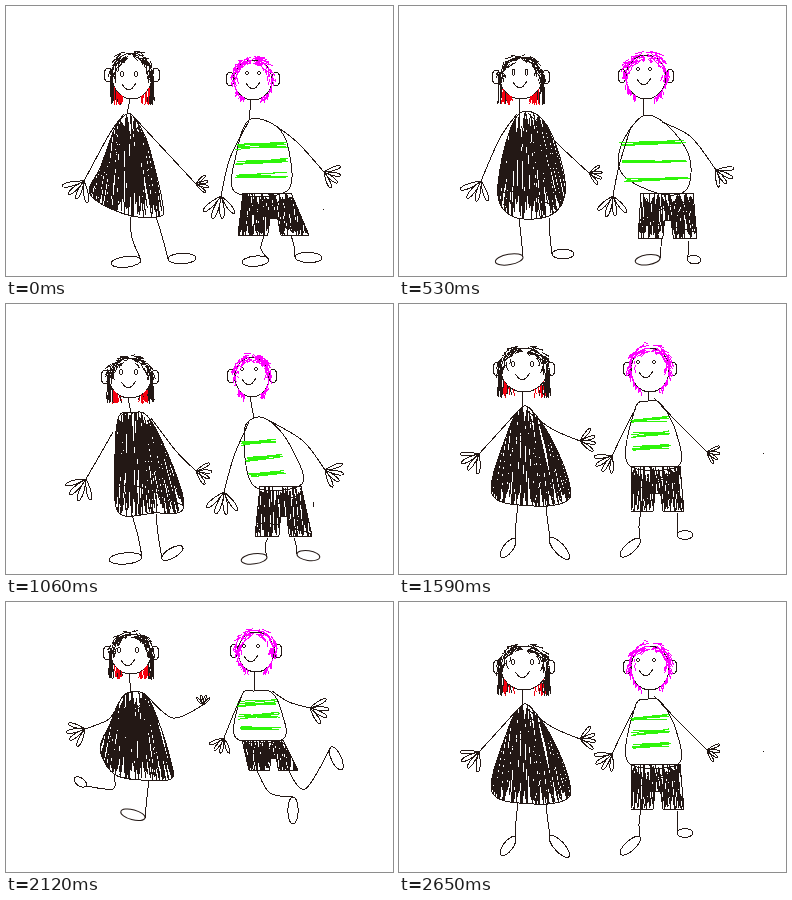
These frames come from a looping animation (387 px wide and 270 px high, 3180 ms). An HTML page:

```html
<!DOCTYPE html>
<html lang="en">
<head>
<meta charset="utf-8">
<title>Two scribbled friends</title>
<style>
html, body { margin: 0; width: 100%; height: 100%; overflow: hidden; background: #fff; }
svg { display: block; width: 387px; height: 270px; shape-rendering: crispEdges; }
path, ellipse { fill: none; stroke-width: 1; stroke-linejoin: round; }
</style>
</head>
<body>
<svg id="stage" viewBox="0 0 387 270"></svg>
<script>
const STEP = 530, ORDER = [0, 1, 2, 3, 4, 3];
const INK = '#231815', RED = '#f5000f', PINK = '#ff00ff', GREEN = '#2ff50a';
const stage = document.getElementById('stage');
let g = stage, seed = 11, clips = 0;

const rnd = (a = 0, b = 1) => a + (b - a) * ((seed = seed * 16807 % 2147483647) / 2147483647);
const jit = a => rnd(-a, a);
const points = s => s.split(' ').map(p => p.split(',').map(Number));
const polar = ([x, y], deg, r, ry = r) => {
  const a = deg * Math.PI / 180;
  return [x + r * Math.cos(a), y + ry * Math.sin(a)];
};

function add(tag, attrs, parent = g) {
  const e = document.createElementNS('http://www.w3.org/2000/svg', tag);
  for (const k in attrs) e.setAttribute(k, attrs[k]);
  return parent.appendChild(e);
}
const line = (d, stroke = INK) => add('path', { d, stroke });
const oval = (cx, cy, rx, ry, fill = 'none', turn = 0) =>
  add('ellipse', { cx, cy, rx, ry, fill, stroke: INK, transform: `rotate(${turn} ${cx} ${cy})` });

// Smooth path through the points
function curve(p, closed) {
  const n = p.length;
  const at = i => closed ? p[(i + n) % n] : p[Math.max(0, Math.min(n - 1, i))];
  let d = 'M' + p[0];
  for (let i = 0; i < (closed ? n : n - 1); i++) {
    const [a, b, c, e] = [at(i - 1), at(i), at(i + 1), at(i + 2)];
    d += `C${b.map((v, k) => v + (c[k] - a[k]) / 6)} ${c.map((v, k) => v - (e[k] - b[k]) / 6)} ${c}`;
  }
  return closed ? d + 'Z' : d;
}

// Pen scribble up and down inside a shape; fan < 1 gathers the strokes at the top
function cloth(p, d, fan) {
  const id = 'cloth' + clips++;
  line(d);
  add('path', { d }, add('clipPath', { id }));
  const [xs, ys] = [0, 1].map(k => p.map(q => q[k]));
  const x0 = Math.min(...xs), x1 = Math.max(...xs), y0 = Math.min(...ys), y1 = Math.max(...ys);
  const mid = p[0][0], h = y1 - y0;
  let s = '';
  for (let pass = 0; pass < 3; pass++) {
    let up = false;
    for (let x = x0 - 8; x < x1 + 8; x += rnd(1, 2.4), up = !up) {
      const f = up ? fan : 1;
      const to = [mid + (x - mid) * f + jit(2), up ? y0 + rnd(-.05, .2) * h : y1 - rnd(-.05, .15) * h];
      s += s ? `Q${mid + (x - mid) * (1 + fan) / 2 + jit(4)} ${y0 + h / 2} ${to}` : 'M' + to;
    }
  }
  line(s).setAttribute('clip-path', `url(#${id})`);
}

// Three bands of sideways pen strokes
function stripes(x0, x1, y0, y1, w, lean) {
  for (let i = 0; i < 3; i++) {
    const y = y0 + (y1 - y0) * i / 2;
    let d = '';
    for (let k = 0; k < 9; k++)
      d += `${k ? 'L' : 'M'}${(k % 2 ? x1 : x0) + lean * i + jit(2)} ${y + jit(w) + (k % 2 ? -1 : 1)}`;
    line(d, GREEN);
  }
}

function shorts(x0, x1, y, left, right, hem) {
  const w = right - left, fork = y + .6 * (hem - y);
  const p = [[x0, y], [x1, y], [right, hem], [left + .6 * w, hem], [left + .56 * w, fork],
    [left + .45 * w, fork], [left + .42 * w, hem], [left, hem]];
  cloth(p, `M${p.join('L')}Z`, .9);
}

function limb(s) {
  const p = points(s);
  line(curve(p));
  return p[p.length - 1];
}

function arm(s, dir, len) {
  const wrist = limb(s);
  for (const turn of [-44, -12, 14, 42]) {
    const tip = side => polar(wrist, dir + turn + side, len * rnd(1.15, 1.35));
    line(`M${wrist}C${tip(-15)} ${tip(15)} ${wrist}`);
  }
}

function leg(s, dir, len) {
  const [x, y] = polar(limb(s), dir, len / 2);
  oval(x, y, len / 2, 3 + len * .08, 'none', dir);
}

// Short strokes lying over the crown
function crown([cx, cy, rx, ry], color, inner, outer) {
  for (let i = 0; i < 95; i++) {
    const a = rnd(-180, 0), r = rnd(inner, outer), out = a < -90 ? -1 : 1;
    const from = polar([cx, cy], a, rx * r, ry * r);
    const r2 = r + jit(.14), b = a + out * rnd(8, 24);
    line(`M${from}L${polar([cx, cy], b, rx * r2, ry * r2)}`, color);
  }
}

// Strands hanging from the edge of the face on both sides
function strands([cx, cy, rx, ry], count, reach, color) {
  for (let i = 0; i < count; i++) {
    const side = i % 2 ? 1 : -1, u = rnd(.45, 1.1), edge = Math.sqrt(Math.max(0, 1 - u * u));
    line(`M${cx + side * u * rx} ${cy + ry * edge}L${cx + side * u * rx + jit(2)} ${cy + ry * reach(edge)}`, color(u));
  }
}

// face: centre, radii, then the middle of the eyes and their half distance
function head(face, pupil, collar) {
  const [cx, cy, rx, ry, ex, ey, gap] = face;
  line(`M${cx - 2} ${cy + ry}L${collar}`);
  oval(cx, cy, rx, ry);
  for (const side of [-1, 1]) {
    oval(cx + side * (rx + 4), cy - 1, 4, 7);
    oval(ex + side * gap, ey, 1.3, pupil, INK);
  }
  line(`M${ex - 7} ${ey + 10}Q${ex} ${ey + 22} ${ex + 7} ${ey + 9}`);
}

function limbs({ arms, legs }) {
  arms.forEach(a => arm(...a));
  legs.forEach(l => leg(...l));
}

function girl(o) {
  const dress = points(o.dress);
  cloth(dress, curve(dress, true), .5);
  limbs(o);
  head(o.face, 3, dress[0]);
  strands(o.face, 64, () => rnd(1.02, 1.28), u => u > .88 || rnd() < .2 ? INK : RED);
  crown(o.face, INK, .78, 1.14);
}

function boy(o) {
  const shirt = points(o.shirt);
  line(curve(shirt, true));
  stripes(...o.stripes);
  shorts(...o.shorts);
  limbs(o);
  head(o.face, 2, shirt[0]);
  strands(o.face, 40, edge => edge + rnd(.1, .35), () => PINK);
  crown(o.face, PINK, .8, 1.2);
}

const tick = (x, y, len) => line(`M${x} ${y}l1 ${len}`);

const POSES = [
  () => {
    girl({
      face: [126, 70, 20, 23, 123, 68, 7],
      dress: '121,108 129,113 142,138 157,200 150,211 118,208 84,188 95,160 109,122',
      arms: [['118,108 104,127 78,175', 125, 23], ['126,109 150,135 190,178', 0, 14]],
      legs: [['124,211 126,232 135,254', 173, 30], ['150,211 156,230 162,253', -2, 28]]
    });
    boy({
      face: [247, 74, 19, 20, 247, 67, 6],
      shirt: '243,114 231,145 229,186 281,185 283,145 270,120',
      stripes: [231, 280, 140, 170, 3, 0], shorts: [237, 285, 187, 232, 303, 229],
      arms: [['243,115 224,152 215,190', 97, 25], ['270,120 292,137 318,166', 25, 19]],
      legs: [['258,230 255,243 263,254', 175, 27], ['285,229 288,240 289,251', 2, 27]]
    });
    tick(317, 203, 1);
  },
  () => {
    girl({
      face: [122, 72, 21, 21, 121, 66, 6.5],
      dress: '121,107 143,113 160,148 166,188 150,210 115,211 99,190 106,140',
      arms: [['118,108 101,132 82,175', 115, 24], ['129,107 160,139 190,167', 10, 15]],
      legs: [['120,213 122,230 124,251', 170, 28], ['151,212 151,230 153,248', 0, 22]]
    });
    boy({
      face: [247, 71, 20, 22, 245, 63, 6],
      shirt: '244,110 222,140 224,169 262,188 288,183 290,150 268,119',
      stripes: [222, 285, 137, 173, 2, 2], shorts: [242, 294, 187, 239, 298, 232],
      arms: [['232,121 220,160 214,190', 95, 23], ['263,116 292,131 317,164', 38, 20]],
      legs: [['262,232 262,241 261,252', 172, 25], ['289,235 290,243 288,253', 5, 14]]
    });
  },
  () => {
    girl({
      face: [124, 74, 21, 20, 122.5, 68, 7.5],
      dress: '125,109 143,114 168,165 177,205 148,209 113,209 109,165 112,115',
      arms: [['107,128 95,149 80,175', 122, 24], ['145,114 170,147 190,167', 15, 17]],
      legs: [['126,211 132,232 136,253', 175, 33], ['150,210 152,230 156,255', -30, 24]]
    });
    boy({
      face: [246, 73, 17, 20, 243, 65, 7],
      shirt: '248,114 238,130 248,182 296,180 285,143 265,118',
      stripes: [236, 271, 138, 170, 3, 4], shorts: [254, 295, 182, 249, 306, 232],
      arms: [['243,118 228,152 218,188', 97, 25], ['262,116 297,137 319,166', 25, 20]],
      legs: [['262,234 259,242 261,253', 172, 26], ['288,234 290,241 291,250', 8, 23]]
    });
    tick(307, 198, 5);
  },
  () => {
    girl({
      face: [125, 66, 23, 22, 123.5, 60, 9.5],
      dress: '123,103 136,110 155,140 170,178 168,197 135,202 93,190 108,130',
      arms: [['118,108 100,128 80,150', 138, 22], ['127,106 153,125 181,137', -5, 18]],
      legs: [['119,201 117,219 116,235', 127, 23], ['147,203 149,220 151,234', 48, 28]]
    });
    boy({
      face: [251, 66, 19, 22, 247, 58, 8],
      shirt: '249,97 236,105 229,160 279,162 277,128 262,100',
      stripes: [233, 268, 116, 144, 3, 1], shorts: [233, 281, 162, 232, 285, 207],
      arms: [['237,104 226,125 213,152', 135, 20], ['255,94 282,122 308,148', 20, 14]],
      legs: [['242,206 240,222 241,235', 138, 26], ['278,209 278,220 278,231', 0, 16]]
    });
    tick(364, 149, 1);
  },
  () => {
    girl({
      face: [125, 52, 20, 20, 122, 48, 9],
      dress: '125,90 140,93 152,118 165,160 165,177 135,178 108,172 94,147 104,122 115,97',
      arms: [['113,100 103,117 79,127', 157, 20], ['140,93 167,116 197,103', -88, 11]],
      legs: [['108,173 107,187 80,184', 215, 14], ['143,178 141,195 139,216', 195, 25]]
    });
    boy({
      face: [250, 50, 18, 20, 245, 44, 7],
      shirt: '248,89 236,93 230,136 277,137 275,108 265,90',
      stripes: [232, 271, 101, 126, 3, 1], shorts: [236, 277, 138, 243, 292, 168],
      arms: [['236,93 228,111 218,136', 115, 18], ['266,89 283,100 304,106', 15, 21]],
      legs: [['251,169 264,191 287,195', 90, 27], ['281,166 299,187 325,145', 65, 25]]
    });
  }
];

POSES.forEach((draw, k) => {
  g = add('g', {}, stage);
  draw();
  const steps = [...ORDER, ORDER[0]].map((p, i) => ({
    opacity: p === k ? 1 : 0, offset: i / ORDER.length, easing: 'steps(1, end)'
  }));
  g.animate(steps, { duration: STEP * ORDER.length, iterations: Infinity }).startTime = 0;
});
</script>
</body>
</html>
```
